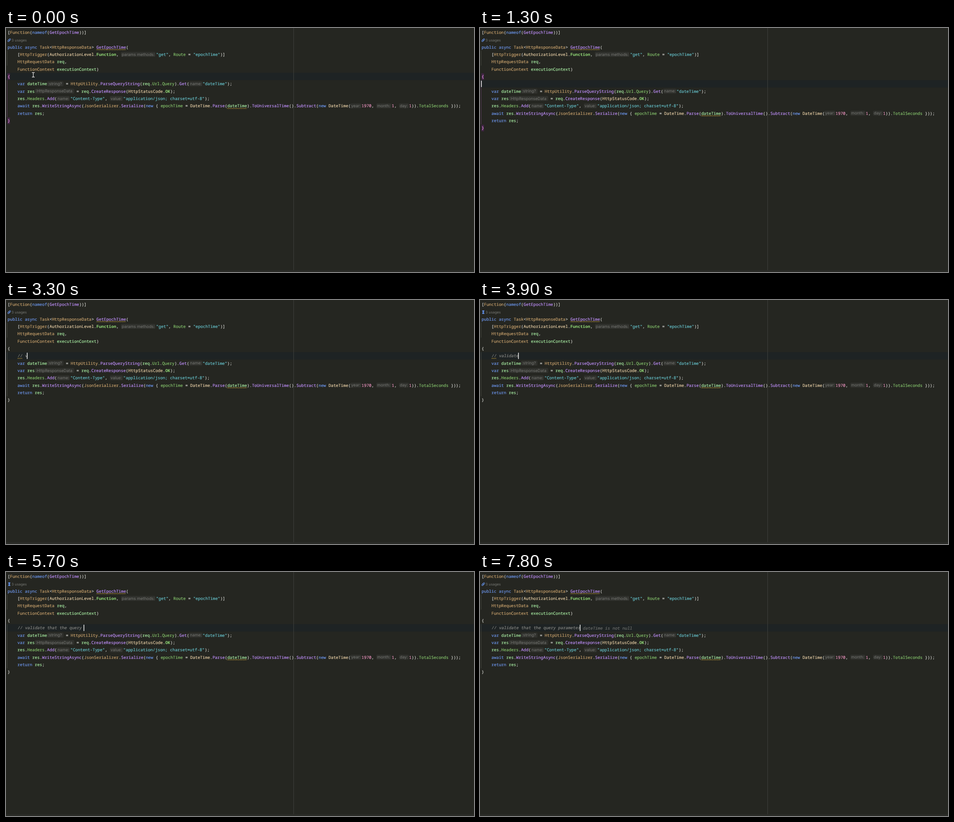
An HTML page that plays this animation: 1034 by 542 pixels, repeating every 8000 ms.

```html
<!DOCTYPE html>
<html lang="en">
<head>
<meta charset="utf-8">
<title>Code editor</title>
<style>
  html, body { margin: 0; width: 100%; height: 100%; overflow: hidden; background: #252621; }
  svg { display: block; width: 100vw; height: 100vh; }
  text { white-space: pre; text-rendering: geometricPrecision; }
  .code { font: 9.09px "Noto Sans Mono", "DejaVu Sans Mono", monospace; stroke-width: .2; }
  .hint { font: 8.9px Inter, Roboto, sans-serif; fill: #777874; }
  .p { fill: #d4d4d0; stroke: #d4d4d0; }
  .k { fill: #6c95eb; stroke: #6c95eb; }
  .c { fill: #c9a26d; stroke: #c9a26d; }
  .s { fill: #e8cfa6; stroke: #e8cfa6; }
  .m { fill: #bf8ffa; stroke: #bf8ffa; }
  .g { fill: #85c46c; stroke: #85c46c; }
  .b { fill: #93dc78; font-weight: bold; }
  .l { fill: #a9efa4; stroke: #a9efa4; }
  .q { fill: #66c3cc; stroke: #66c3cc; }
  .n { fill: #ed94c0; stroke: #ed94c0; }
  .note { fill: #858682; stroke: #858682; }
  .ghost { fill: #6d6f6c; stroke: #6d6f6c; }
  .wave { fill: none; stroke: #c4a03c; stroke-width: .9; }
  .icon { fill: none; stroke: #6490e4; stroke-width: 1.1; }
</style>
</head>
<body>
<svg id="stage" viewBox="0 0 1034 542" preserveAspectRatio="none"></svg>
<script>
const LOOP = 8000, ADV = 5.454, PITCH = 16.33, LEFT = 3.5, INDENT = 25.3, EDIT_ROW = 7;
const stage = document.getElementById('stage');
const mid = row => 9.7 + PITCH * row;
const base = row => mid(row) + 3.3;

function add(parent, tag, attrs, text) {
  const el = document.createElementNS('http://www.w3.org/2000/svg', tag);
  for (const name in attrs) el.setAttribute(name, attrs[name]);
  if (text !== undefined) el.textContent = text;
  parent.appendChild(el);
  return el;
}

function rect(parent, x, y, width, height, fill, rx = 0) {
  return add(parent, 'rect', { x, y, width, height, fill, rx });
}

// Tokens are parted by "~"; the first letter of each one is its colour class.
function code(parent, row, x, source) {
  const line = add(parent, 'text', { class: 'code', y: base(row) });
  let col = 0;
  for (const token of source.split('~')) {
    add(line, 'tspan', { class: token[0], x: x + col * ADV }, token.slice(1));
    col += token.length - 1;
  }
}

function hint(parent, row, x, width, label) {
  rect(parent, x, mid(row) - 5.6, width, 11, '#30312d', 2.5);
  add(parent, 'text', { class: 'hint', x: x + 1.7, y: base(row) - .4 }, label);
}

function wave(parent, row, x, cols) {
  const y = mid(row) + 6.6, end = x + cols * ADV;
  let d = `M${x} ${y}`;
  for (let i = 1; x + i * 1.8 <= end; i++) d += `L${x + i * 1.8} ${y - (i % 2) * 1.7}`;
  return add(parent, 'path', { class: 'wave', d });
}

// Slanted comment text with its baseline start at x, y
function slant(el, x, y) {
  el.setAttribute('transform', `translate(${x} ${y}) skewX(-9)`);
}

const show = (el, on) => el.setAttribute('visibility', on ? 'visible' : 'hidden');

// Backdrop
rect(stage, 0, 0, 1034, 542, '#252621');
const band = rect(stage, 0, 0, 1034, PITCH, '#1e2324');
rect(stage, 635, 0, 1, 538, '#3f403c');
rect(stage, 0, 538, 1034, 4, '#2a2b27');
rect(stage, 2, 50.5, 1, 33, '#41423c');
const guide = rect(stage, 2, 116, 1, 82, '#41423c');

// Signature
code(stage, 0, LEFT, 'p[~cFunction~p(~knameof~p(~mGetEpochTime~p))]');
add(stage, 'text', { class: 'hint', x: 12.3, y: 29.8, style: 'font-size:7.8px' }, '3 usages');
code(stage, 2, LEFT, 'kpublic async ~cTask~p<~cHttpResponseData~p> ~mGetEpochTime~p(');
wave(stage, 2, 199.6, 12);
code(stage, 3, INDENT, 'p[~cHttpTrigger~p(~sAuthorizationLevel~p.~bFunction~p, ');
hint(stage, 3, 254, 76, 'params methods:');
code(stage, 3, 331.6, 'q"get"~p, ~gRoute~p = ~q"epochTime"~p)]');
code(stage, 4, INDENT, 'cHttpRequestData ~lreq~p,');
code(stage, 5, INDENT, 'cFunctionContext ~lexecutionContext~p)');

// Method body, which moves down by one row
const body = add(stage, 'g', {});
code(body, 7, INDENT, 'kvar ~ldateTime');
hint(body, 7, 91, 36, ':string?');
code(body, 7, 132.2, 'p= ~cHttpUtility~p.~mParseQueryString~p(~lreq~p.~gUrl~p.~gQuery~p).~mGet~p(');
hint(body, 7, 405, 28.5, 'name:');
code(body, 7, 434.3, 'q"dateTime"~p);');

code(body, 8, INDENT, 'kvar ~lres');
hint(body, 8, 63.8, 87, ':HttpResponseData');
code(body, 8, 155.7, 'p= ~lreq~p.~mCreateResponse~p(~sHttpStatusCode~p.~bOK~p);');

code(body, 9, INDENT, 'lres~p.~gHeaders~p.~mAdd~p(');
hint(body, 9, 112.3, 28.5, 'name:');
code(body, 9, 142.2, 'q"Content-Type"~p, ');
hint(body, 9, 229.3, 29, 'value:');
code(body, 9, 259, 'q"application/json; charset=utf-8"~p);');

code(body, 10, INDENT, 'kawait ~lres~p.~mWriteStringAsync~p(~cJsonSerializer~p.~mSerialize~p(~knew ~p{ ' +
  '~gepochTime~p = ~sDateTime~p.~mParse~p(~ldateTime~p).~mToUniversalTime~p().~mSubtract~p(~knew ~sDateTime~p(');
wave(body, 10, 488.4, 8);
hint(body, 10, 761, 24, 'year:');
code(body, 10, 785.6, 'n1970~p, ');
hint(body, 10, 818.3, 33, 'month:');
code(body, 10, 852.2, 'n1~p, ');
hint(body, 10, 868.3, 21.5, 'day:');
code(body, 10, 890.5, 'n1~p)).~gTotalSeconds~p }));');
code(body, 11, INDENT, 'kreturn ~lres~p;');

// Braces
const braces = [[stage, 6, '{'], [body, 12, '}']].map(([parent, row, glyph]) => {
  const box = rect(parent, 3, mid(row) - 7, 6, 14.5, '#3f2442');
  const text = add(parent, 'text', { class: 'code', x: LEFT, y: base(row) }, glyph);
  return { box, text };
});

// Usage icons
const link = add(stage, 'g', { class: 'icon', transform: 'translate(7.1 27) rotate(-45)' });
add(link, 'rect', { x: -3.9, y: -1.5, width: 4.5, height: 3, rx: 1.5 });
add(link, 'rect', { x: -.6, y: -1.5, width: 4.5, height: 3, rx: 1.5 });
const busy = add(stage, 'path', {
  class: 'icon', style: 'fill:#5b87dc;stroke-width:.9',
  d: 'M4.8 23.7H9.7M4.8 30.3H9.7M5.5 23.9H9L8.7 25.6L7.6 27L8.7 28.4L9 30.1H5.5L5.8 28.4L6.9 27L5.8 25.6Z'
});

// Comment being typed
const TYPED = '// validate that the query parameter';
const FIRST_GUESS = '// get the dateTime query parameter';
const LAST_GUESS = TYPED + ' dateTime is not null';
const note = add(stage, 'text', { class: 'code note' });
const ghost = add(stage, 'text', { class: 'code ghost' });
slant(note, INDENT, base(EDIT_ROW));
const typo = wave(stage, EDIT_ROW, INDENT, 2);
const caret = rect(stage, 0, 0, 1.5, 14, '#f4f4f2');

const mouse = add(stage, 'g', { fill: 'none', 'stroke-linecap': 'square' });
const beam = 'M-2.3 -5H-1.2L0 -4.2L1.2 -5H2.3M0 -4.2V4.2M-2.3 5H-1.2L0 4.2L1.2 5H2.3';
add(mouse, 'path', { d: beam, stroke: '#111', 'stroke-width': 2.4 });
add(mouse, 'path', { d: beam, stroke: '#f0f0f0', 'stroke-width': 1.3 });

// Pairs of time in ms and number of typed characters
const KEYS = [
  [2000, 1], [2100, 2], [3100, 3], [3300, 4], [3400, 5], [3500, 6], [3600, 7], [3700, 9],
  [3900, 11], [4000, 12], [4100, 13], [4300, 15], [4400, 16], [4600, 17], [4700, 18], [4800, 20],
  [5000, 21], [5100, 23], [5200, 24], [5300, 26], [5700, 27], [5900, 28], [6000, 29], [6100, 30],
  [6200, 31], [7300, 32], [7400, 33], [7600, 34], [7700, 35], [7800, 36]
];
const BUSY = [[1600, 2500], [3500, 4000], [4700, 5900], [6300, 7400]];
const within = (t, from, to) => t >= from && t < to;

function draw(t) {
  const split = t >= 1300, matched = t < 1500;
  const row = split ? EDIT_ROW : EDIT_ROW - 1;
  const count = KEYS.reduce((n, [at, chars]) => t >= at ? chars : n, 0);

  band.setAttribute('y', mid(row) - PITCH / 2);
  body.setAttribute('transform', `translate(0 ${split ? PITCH : 0})`);
  guide.setAttribute('height', split ? 98 : 82);
  guide.setAttribute('fill', matched ? '#573a58' : '#41423c');
  for (const { box, text } of braces) {
    const color = matched ? '#f3a3f0' : '#d4d4d0';
    show(box, matched);
    text.setAttribute('fill', color);
    text.setAttribute('stroke', color);
    text.setAttribute('font-weight', matched ? 'bold' : 'normal');
  }

  const working = BUSY.some(([from, to]) => within(t, from, to));
  show(busy, working);
  show(link, !working);

  note.textContent = TYPED.slice(0, count);
  const guess = within(t, 2300, 3200) ? FIRST_GUESS : t >= 6700 ? LAST_GUESS : '';
  ghost.textContent = guess.slice(count);
  slant(ghost, INDENT + count * ADV, base(EDIT_ROW) + .8);
  show(typo, within(t, 2300, 4000));

  const caretX = !split ? 8.9 : t < 1400 ? LEFT : INDENT + count * ADV;
  caret.setAttribute('x', caretX - 1.1);
  caret.setAttribute('y', mid(row) - 6.9);
  show(caret, t >= 400);

  mouse.setAttribute('transform', t < 800 ? 'translate(60.3 104)' : 'translate(63.6 106)');
  show(mouse, t < 1300 || within(t, 2200, 3100));
}

const start = performance.now();
function tick() {
  draw((performance.now() - start) % LOOP);
  requestAnimationFrame(tick);
}
tick();
</script>
</body>
</html>
```
